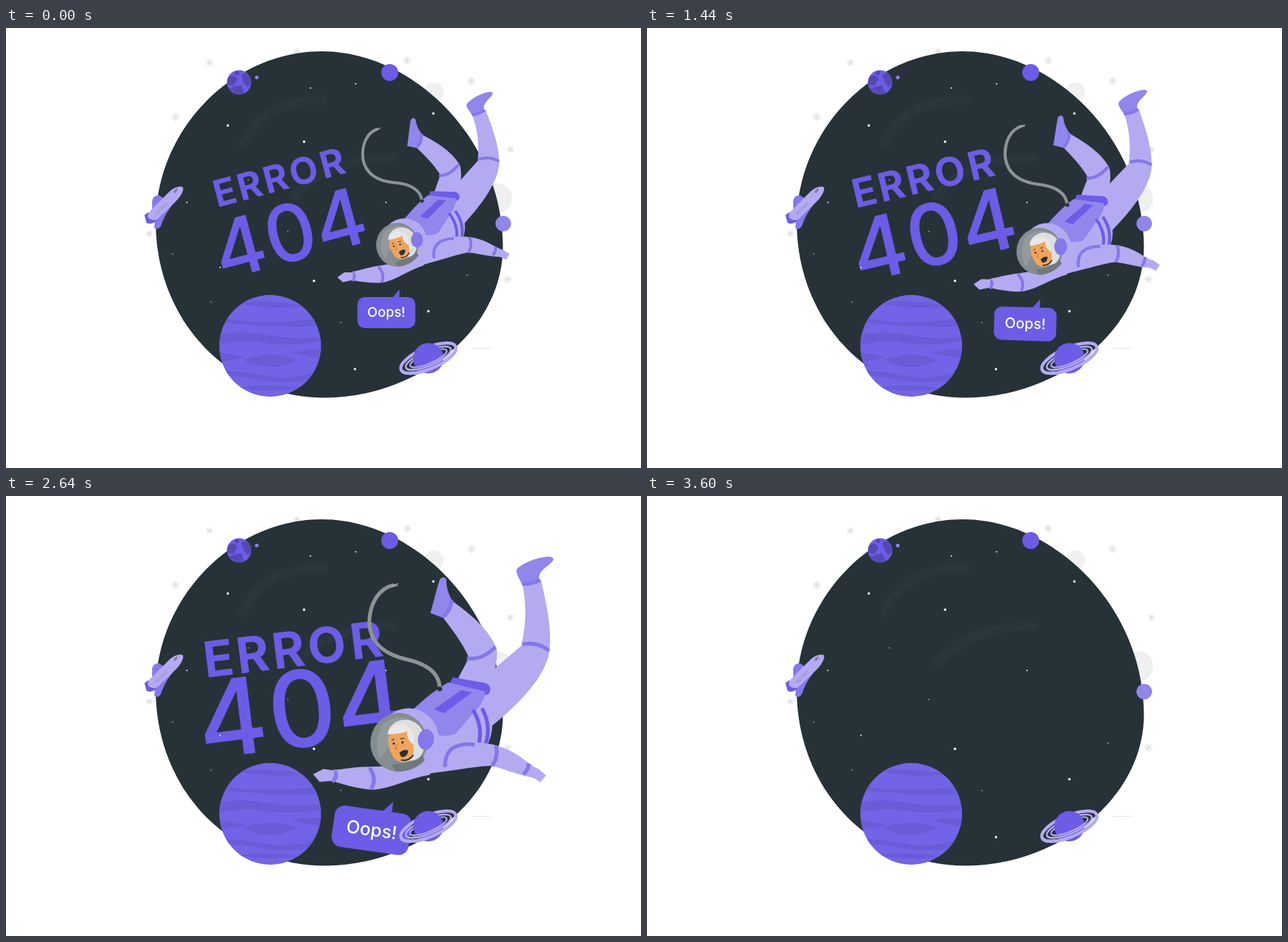
These frames come from a looping animation (899 px wide and 623 px high, 3660 ms). An HTML page:

```html
<!DOCTYPE html>
<html lang="en">
<head>
<meta charset="utf-8">
<title>Error 404</title>
<style>
html, body { margin: 0; width: 100%; height: 100%; overflow: hidden; background: #fff; }
svg { display: block; width: 899px; height: 623px; }
text { font-family: Inter, "Open Sans", sans-serif; }
.main { fill: #6c5ce7; }
.mid { fill: #9186ec; }
.light { fill: #b4aaf2; }
.band { fill: none; stroke: #8477e8; stroke-width: 4; }
.strap { fill: none; stroke: #6c5ce7; stroke-width: 4; }
.title { font-weight: 700; font-size: 52.5px; text-anchor: middle; }
.code { font-weight: 500; font-size: 112px; text-anchor: middle; }
</style>
</head>
<body>
<svg viewBox="0 0 899 623">
  <defs>
    <clipPath id="globe"><circle cx="374" cy="450" r="72"/></clipPath>
    <clipPath id="moon"><circle cx="330" cy="77" r="17.3"/></clipPath>
    <clipPath id="front"><path d="M-60 0H60V40H-60Z"/></clipPath>
  </defs>

  <g id="sparks" stroke="#e0e0e0" stroke-width="1.2"></g>
  <g fill="#f0f0f0">
    <circle cx="606" cy="91" r="14"/>
    <circle cx="695" cy="241" r="21.5"/>
  </g>
  <path d="M660 453.5H687" stroke="#e8e8e8"/>
  <path fill="#263238" d="M447 33C575 33 703 155 703.500 310C703 430 580 523 452 523.500C310 523 212 410 212 275C212 145 320 33 447 33Z"/>
  <path fill="none" stroke="#2a363b" stroke-width="13" stroke-linecap="round" d="M336 164Q365 100 450 102M410 238Q455 184 548 184"/>

  <!-- moons -->
  <circle class="main" cx="330" cy="77" r="17.3"/>
  <g clip-path="url(#moon)" fill="#5648b4">
    <path d="M314 70Q322 64 328 72L322 82L313 80ZM333 66L345 62L349 76L342 84L336 76ZM320 84L333 81L338 94L324 97Z"/>
    <circle cx="327" cy="64" r="3"/>
    <circle cx="318" cy="88" r="3"/>
  </g>
  <circle class="mid" cx="355" cy="70" r="2.600"/>
  <circle class="main" cx="543.300" cy="63" r="12"/>
  <circle class="mid" cx="704" cy="277" r="11"/>

  <!-- shuttle -->
  <path fill="#8578ea" d="M207 244Q209 236 217 237L223 241L207 258ZM211 270L240 245Q225 262 219 281Q214 287 210 283Z"/>
  <path class="main" d="M196 265L201 261L213 273Q206 279 199 276Z"/>
  <path class="light" d="M250 225C253 229 247 239 240 246L214 271Q207 274 201 268Q200 262 206 257L232 231Q242 223 250 225Z"/>
  <path fill="#7d78a0" d="M237 232Q240 227 243 227L242 231L239 234Z"/>
  <text transform="translate(213 266) rotate(-45)" font-size="6" fill="#8f88bd">VOYAGE</text>

  <g id="error"><g transform="rotate(-15)">
    <text class="title main" x="239 275.500 313.500 354.500 396.500" y="323">ERROR</text>
  </g></g>
  <g id="code"><g transform="rotate(-15)">
    <text class="code main" x="239 313.500 386" y="424.500">404</text>
  </g></g>

  <g id="stars" fill="#fff"></g>

  <g id="pilot">
    <!-- far leg -->
    <path class="light" d="M660 123C668 145 670 165 668 188C650 208 634 225 622 245L642 284C668 256 694 225 698 195C700 170 688 140 679 116Z"/>
    <path class="mid" d="M652 108C658 100 672 93 681 91Q689 89 689 93Q688 96 683 101C676 108 676 112 677 116L660 124C657 118 651 113 652 108Z"/>
    <path class="band" d="M660 123Q670 122 678 116M669 186Q685 181 698 189"/>
    <!-- near leg -->
    <path class="light" d="M589 151C610 162 630 174 642 193C647 205 643 225 640 243L604 240C609 224 613 214 615 208C605 192 592 180 581 169Z"/>
    <path class="mid" d="M573 130Q577 125 580 130C581 140 586 146 589 151C589 160 585 166 582 170L568 167C570 155 571 140 573 130Z"/>
    <path class="band" d="M588 150Q590 160 582 169M613 209Q629 209 641 193"/>
    <!-- torso -->
    <path class="light" d="M638 244C650 264 653 284 646 299L602 331C590 337 575 339 563 336L553 282L600 252Z"/>
    <path class="main" d="M601 231L636 232Q643 234 642 241Q640 246 632 245L597 242Z"/>
    <path class="mid" d="M597 237L637 241Q638 251 630 262L612 290C600 297 578 295 562 273C576 255 588 244 597 237Z"/>
    <path class="main" d="M586 267L612 243L623 244L597 270Z"/>
    <path class="strap" d="M636 259Q649 276 645 297M627 262Q640 278 638 297"/>
    <!-- arms -->
    <path class="light" d="M584 334C596 312 606 297 632 296C655 293 674 298 690 308L704 315L697 324C680 323 664 318 653 318C632 322 610 331 584 336Z"/>
    <path class="band" stroke-width="6" d="M634 298Q602 299 606 326"/>
    <path class="band" d="M656 296Q661 307 655 318" stroke-width="3"/>
    <path class="light" d="M690 312L704 314L713 320L708 328L702 325L690 322Z"/>
    <path class="band" d="M693 310Q694 317 689 322" stroke-width="3"/>
    <path class="light" d="M585 329C560 330 540 335 520 338C505 341 495 345 490 345L490 357C505 360 525 362 536 360C555 355 570 343 592 336Z"/>
    <path class="band" d="M527 338Q537 348 532 360M491 346Q496 352 490 358" stroke-width="3"/>
    <path class="light" d="M469 353L479 346L491 346L490 357L477 360Z"/>
    <!-- helmet -->
    <ellipse class="light" cx="564" cy="303" rx="32" ry="33.500"/>
    <ellipse fill="#858d90" cx="554" cy="307" rx="30" ry="31"/>
    <path fill="#a6adae" d="M534 291Q544 279 560 280L537 327Q527 314 534 291Z" opacity=".4"/>
    <path fill="#70797c" d="M550 331Q566 330 580 316L584 322Q574 336 555 338Z"/>
    <path fill="#dededf" d="M541 297Q545 283 561 282Q578 284 581 302Q583 318 574 323L562 327L551 303Z"/>
    <path fill="#f0a45c" d="M543 300Q552 297 561 292Q564 302 570 308Q573 319 567 325Q558 330 551 324C545 317 541 307 543 300Z"/>
    <path fill="#e8e8e8" d="M541 300Q542 289 555 288Q565 288 569 298L570 307Q562 304 561 294Q552 299 541 300Z"/>
    <ellipse fill="#8578ea" cx="582" cy="300" rx="8.500" ry="11"/>
    <g fill="#263238">
      <circle cx="549" cy="309" r="1.200"/>
      <circle cx="558" cy="306.500" r="1.200"/>
      <path d="M556 318Q560 313 565 314Q566 321 559 322Z"/>
    </g>
    <path fill="none" stroke="#263238" stroke-width=".9" d="M546 306L549 304M555 303L559 302"/>
    <path fill="none" stroke="#d9783f" d="M553 309L551 314L554 314"/>
    <path fill="none" stroke="#263238" stroke-width="1.500" d="M559 325Q567 326 571 318"/>
    <!-- tether -->
    <path fill="none" stroke="#8d9496" stroke-width="4" d="M526 143C511 148 503 165 505.500 186C510 209 528 217 550 219C575 221 587 230 589 245"/>
    <path fill="none" stroke="#a9afb0" stroke-width="1" d="M524 144L530 141M525 144L530 143"/>
    <circle fill="#263238" cx="589" cy="245" r="2.500"/>
    <!-- speech -->
    <path class="main" d="M546 383L557 370L557 383Z"/>
    <rect class="main" x="497.500" y="381" width="82" height="44" rx="10.500"/>
    <text x="538.500" y="409" font-size="19" font-weight="500" text-anchor="middle" fill="#fff">Oops!</text>
  </g>

  <!-- large planet -->
  <circle cx="374" cy="450" r="72" fill="#7264e6"/>
  <g clip-path="url(#globe)" fill="#6a5cd6">
    <path d="M330 389Q375 384 425 394Q370 400 330 389ZM300 409Q350 420 405 415T450 410V422Q400 424 360 421T300 417Z"/>
    <path d="M300 434Q340 428 372 435T450 436V443Q400 452 368 446T300 449Z"/>
    <path d="M336 470Q372 455 412 470Q374 490 336 470ZM300 460Q318 460 338 466Q318 472 300 472ZM450 456Q420 454 404 460Q424 466 450 467Z"/>
    <path d="M300 484Q340 487 372 493T450 484V497Q400 505 366 499T300 492ZM325 509Q370 502 420 511Q370 516 325 509Z"/>
  </g>

  <!-- ringed planet -->
  <g transform="translate(598 467.500) rotate(-23)" fill="none" stroke="#b4aaf2">
    <g id="rings">
      <ellipse rx="42" ry="15" stroke-width="4.500"/>
      <ellipse rx="34.500" ry="10.500" stroke-width="2.500"/>
      <ellipse rx="28" ry="7.500" stroke-width="2"/>
    </g>
    <circle class="main" r="21.500" stroke="none"/>
    <use href="#rings" clip-path="url(#front)"/>
  </g>
</svg>
<script>
const LOOP = 3660, STEP = 60;
const $ = id => document.getElementById(id);

// x, y, radius
const sparks = [[288,49,5], [240,126,6], [412,33,5], [568,46,6], [659,75,6],
  [714,172,5], [710,356,6.5], [203,291,5], [252,413,5]];
const stars = [[314,138,1.7], [422,161,1.8], [605,121,1.7], [431,85,1], [495,79,1],
  [343,215,.7], [256,247,1], [399,288,.7], [538,247,1], [303,339,1], [236,320,.7],
  [436,358,1.8], [598,401,1.8], [494,483,1.7], [653,350,.8], [290,388,.7], [474,417,.7]];

$('sparks').innerHTML = sparks.map(([x, y, r]) =>
  [0, 45, 90, 135].map(a =>
    `<path d="M${-r} 0H${r}" transform="translate(${x} ${y}) rotate(${a})"/>`).join('')).join('');
$('stars').innerHTML = stars.map(([x, y, r]) =>
  `<circle cx="${x}" cy="${y}" r="${r}"/>`).join('');

// Each group grows and turns about its own pivot
const groups = [['error', 333, 225], ['code', 349, 286], ['pilot', 494, 213]];

function draw(t) {
  const u = t / 2880;
  const grow = .265 * u ** 2 + .165 * u ** 4;
  const alpha = Math.min(1, Math.max(0, (3330 - t) / 570));
  for (const [id, x, y] of groups) {
    const g = $(id);
    g.setAttribute('transform',
      `translate(${x} ${y}) rotate(${23.6 * grow}) scale(${1 + grow}) translate(${-x} ${-y})`);
    g.setAttribute('opacity', alpha);
  }
}

const start = performance.now();
function tick(now) {
  const t = Math.max(0, now - start) % LOOP;
  draw(Math.floor(t / STEP) * STEP);
  requestAnimationFrame(tick);
}
draw(0);
requestAnimationFrame(tick);
</script>
</body>
</html>
```
